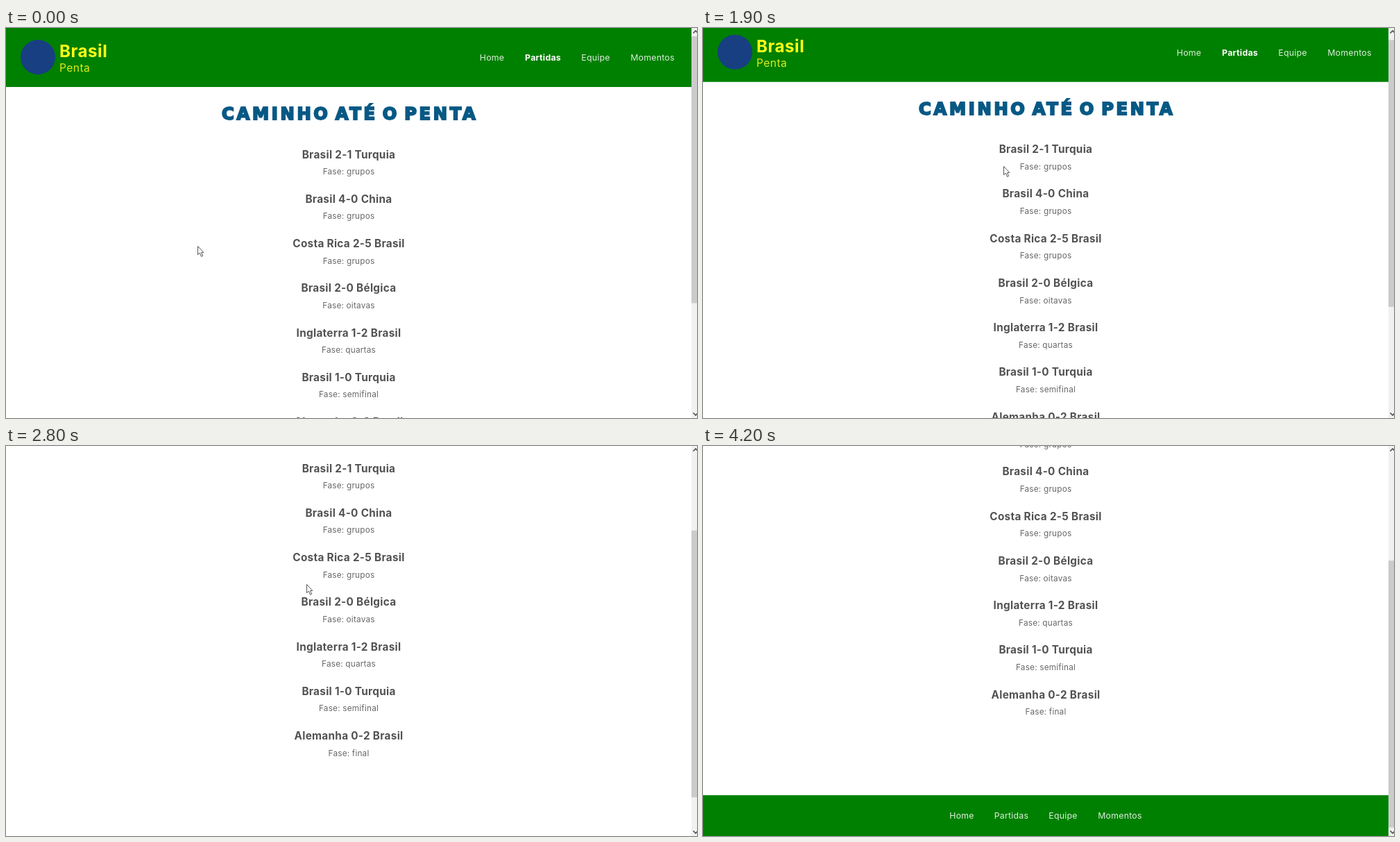
Animation, 996 px wide and 562 px high, one loop 4900 ms. Source, as an HTML page:

```html
<!DOCTYPE html>
<html lang="pt-BR">
<head>
<meta charset="utf-8">
<title>Caminho até o Penta</title>
<style>
  html, body { margin: 0; width: 100%; height: 100%; overflow: hidden; background: #fff; }
  svg { display: block; width: 996px; height: 562px; font-family: Inter, sans-serif; }
  .bar { fill: #008000; }
  .brand { font-size: 24.2px; font-weight: 700; letter-spacing: .5px; fill: #ffff1a; }
  .tagline { font-size: 15.6px; letter-spacing: .4px; fill: #dcea1c; }
  .title { font: 700 24.2px "DejaVu Sans", sans-serif; letter-spacing: 3.7px; word-spacing: -5px; fill: #075985; stroke: #075985; stroke-width: 2px; }
  .match { font-size: 15.3px; font-weight: 700; letter-spacing: .3px; fill: #525252; }
  .phase { font-size: 11.8px; letter-spacing: .2px; fill: #686868; }
  .link { font-size: 12.3px; letter-spacing: .25px; fill: #dceedc; }
  .active { font-weight: 700; fill: #fff; }
  .title, .match, .phase, .link { text-anchor: middle; }
  .arrow { fill: none; stroke: #505050; stroke-width: 1.6; }
</style>
</head>
<body>
<svg viewBox="0 0 996 562">
  <g id="page">
    <rect class="bar" width="988" height="85"/>
    <circle cx="46" cy="42" r="25" fill="#173f82"/>
    <text class="brand" x="77" y="42">Brasil</text>
    <text class="tagline" x="77" y="63">Penta</text>
    <text class="title" x="495.8" y="132">CAMINHO ATÉ O PENTA</text>
    <rect class="bar" y="712.5" width="988" height="62"/>
  </g>
  <rect x="988" width="8" height="562" fill="#f1f1f1"/>
  <rect id="thumb" x="988" y="12" width="8" height="384.5" fill="#cbcbcb"/>
  <path class="arrow" d="M990.5 7.5l3.5-3.5 3.5 3.5M990.5 554.5l3.5 3.5 3.5-3.5"/>
  <path id="cursor" d="M.5 .5v12.2l2.9-2.6 2.1 5.2 2.1-.9-2.1-5h3.3z" fill="#fff" stroke="#555"/>
</svg>
<script>
const LOOP = 4900, STEP = 100;
const page = document.getElementById("page");
const thumb = document.getElementById("thumb");
const cursor = document.getElementById("cursor");

function addText(className, x, y, content) {
  const node = document.createElementNS(page.namespaceURI, "text");
  node.setAttribute("class", className);
  node.setAttribute("x", x);
  node.setAttribute("y", y);
  node.textContent = content;
  page.append(node);
}

const matches = [
  ["Brasil 2-1 Turquia", "grupos"],
  ["Brasil 4-0 China", "grupos"],
  ["Costa Rica 2-5 Brasil", "grupos"],
  ["Brasil 2-0 Bélgica", "oitavas"],
  ["Inglaterra 1-2 Brasil", "quartas"],
  ["Brasil 1-0 Turquia", "semifinal"],
  ["Alemanha 0-2 Brasil", "final"],
];
matches.forEach(([score, phase], i) => {
  const y = 187.5 + i * 64.25;
  addText("match", 494, y, score);
  addText("phase", 494, y + 23.7, "Fase: " + phase);
});

const links = [["Home", 700.5, 373], ["Partidas", 774, 444.5], ["Equipe", 850, 519], ["Momentos", 932, 601]];
for (const [label, headerX, footerX] of links) {
  addText(label === "Partidas" ? "link active" : "link", headerX, 47.2, label);
  addText("link", footerX, 746, label);
}

// Keys are [step, ...values]; scroll holds its value, the cursor moves linearly.
const scrollKeys = [[0, 0], [19, 7.3], [20, 46], [21, 75], [26, 80.5], [27, 121], [28, 150], [31, 175.7], [32, 202], [33, 209.3]];
const cursorKeys = [[0, 276, 314], [6, 398, 177], [8, 398, 177], [12, 433, 207], [13, 433, 207],
  [15, 424, 204], [17, 433, 199], [38, 433, 199], [41, 600, 231]];
const CURSOR_GONE = 42;

function interpolate(keys, step) {
  const next = keys.findIndex(key => key[0] > step);
  if (next < 0) return keys.at(-1).slice(1);
  const a = keys[next - 1], b = keys[next];
  const p = (step - a[0]) / (b[0] - a[0]);
  return [1, 2].map(i => a[i] + (b[i] - a[i]) * p);
}

function draw() {
  const step = Math.floor((performance.now() % LOOP) / STEP);
  const scroll = scrollKeys.findLast(key => key[0] <= step)[1];
  page.setAttribute("transform", `translate(0 ${-scroll})`);
  thumb.setAttribute("y", 12 + scroll * 0.732);
  cursor.setAttribute("transform", `translate(${interpolate(cursorKeys, step)})`);
  cursor.setAttribute("visibility", step < CURSOR_GONE ? "visible" : "hidden");
  requestAnimationFrame(draw);
}
draw();
</script>
</body>
</html>
```
